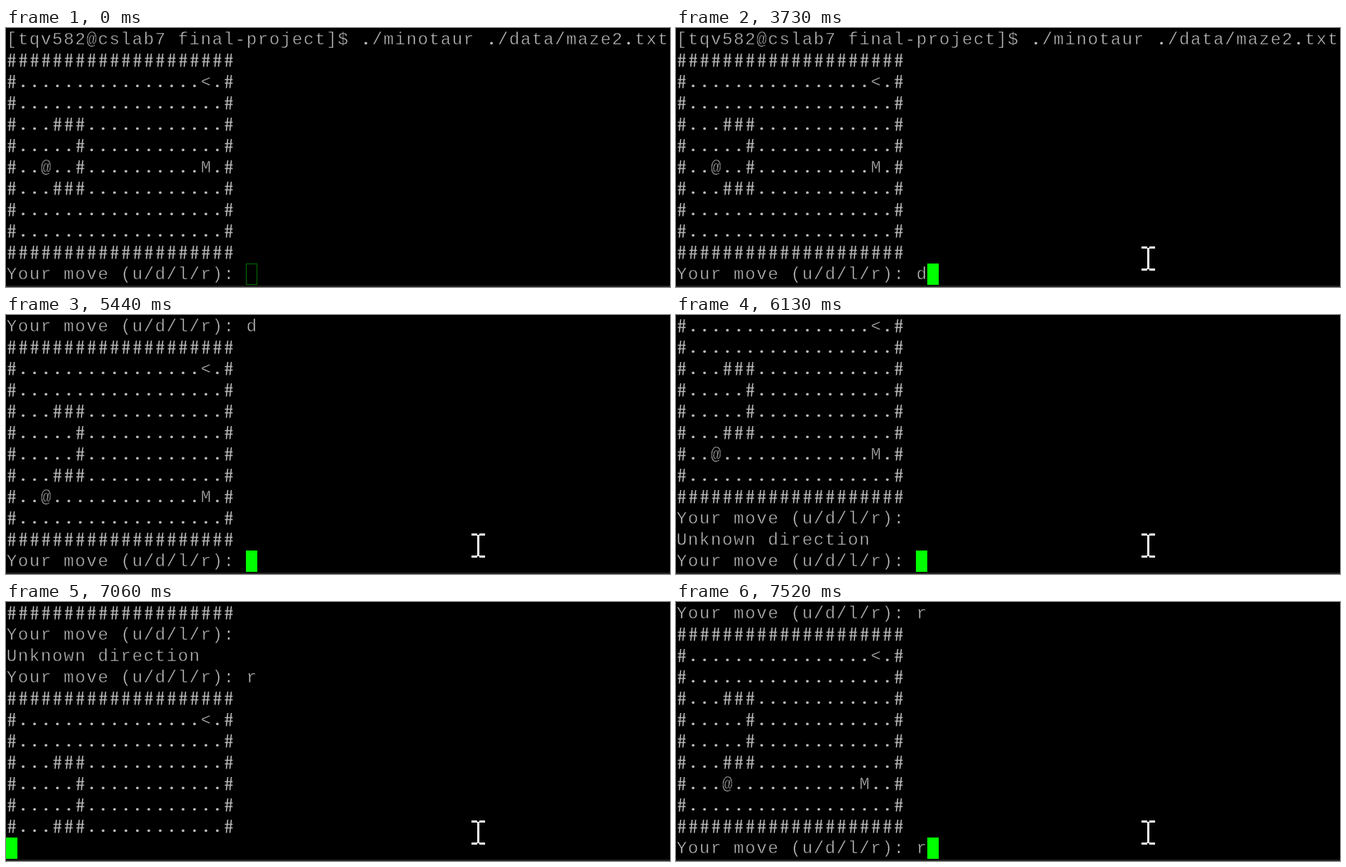
An HTML page with a canvas that plays this animation: 930x364 px, repeating every 8000 ms.

```html
<!DOCTYPE html>
<html lang="en">
<head>
<meta charset="utf-8">
<title>Maze game in a terminal</title>
<style>
  html, body { margin: 0; width: 100%; height: 100%; overflow: hidden; background: #000; }
  canvas { display: block; }
</style>
</head>
<body>
<canvas id="stage" width="930" height="364"></canvas>
<script>
const LOOP = 8000, ROWS = 12, COL_WIDTH = 16, ROW_HEIGHT = 30, TOP = 1, BASELINE = 22;
const ASK = "Your move (u/d/l/r): ";
const ctx = document.getElementById("stage").getContext("2d");

// Wall and floor marks, relative to the top left of a character cell.
const WALL = new Path2D("M6.6 5L4.6 23.5M11.6 5L9.6 23.5M2.5 11.5H13.5M2.5 16.5H13.5");
const FLOOR = new Path2D("M8 20.3h.01");
const POINTER = new Path2D("M652 308.5H660M663 308.5H671M661.5 309V339M652 339.5H660M663 339.5H671");

// Maze lines with the hero (@) and the minotaur (M) on the same row.
function maze(row, heroCol, monsterCol) {
  const edge = "#".repeat(20), open = "#" + ".".repeat(18) + "#";
  const corner = "#...###............#", wall = "#.....#............#";
  const lines = [edge, open, open, corner, wall, wall, corner, open, open, edge];
  const put = (y, x, mark) => {
    lines[y] = lines[y].slice(0, x) + mark + lines[y].slice(x + 1);
  };
  put(1, 17, "<");
  put(row, heroCol, "@");
  put(row, monsterCol, "M");
  return lines.map(line => line + "\n");
}

const turn = (...places) => maze(...places).join("") + ASK;
const lastMaze = maze(7, 4, 16);

// Text appended to the terminal at each time.
const output = [
  [0, "[tqv582@cslab7 final-project]$ ./minotaur ./data/maze2.txt\n" + turn(5, 3, 17)],
  [3730, "d"],
  [4510, "\n" + turn(6, 3, 17)],
  [5440, "d\n" + turn(7, 3, 17)],
  [6130, "\nUnknown direction\n" + ASK],
  [6750, "r"],
  [7060, "\n" + lastMaze.slice(0, 7).join("")],
  [7290, lastMaze.slice(7).join("") + ASK],
  [7520, "r"],
];

function strokePath(path, x, y, width, color) {
  ctx.save();
  ctx.translate(x, y);
  ctx.lineWidth = width;
  ctx.strokeStyle = color;
  ctx.stroke(path);
  ctx.restore();
}

function drawChar(char, x, y) {
  if (char === "#") return strokePath(WALL, x, y, 1.6, "#bbb");
  if (char === ".") {
    ctx.lineCap = "round";
    strokePath(FLOOR, x, y, 3.8, "#bbb");
    ctx.lineCap = "butt";
    return;
  }
  // A thin black outline keeps the strokes fine.
  ctx.fillStyle = "#bbb";
  ctx.strokeStyle = "#000";
  ctx.lineWidth = 0.5;
  ctx.fillText(char, x + COL_WIDTH / 2, y + BASELINE);
  ctx.strokeText(char, x + COL_WIDTH / 2, y + BASELINE);
}

function drawCursor(x, y, focused) {
  if (focused) {
    ctx.fillStyle = "#0f0";
    ctx.fillRect(x, y, COL_WIDTH, ROW_HEIGHT);
  } else {
    ctx.strokeStyle = "#007000";
    ctx.lineWidth = 1;
    ctx.strokeRect(x + 0.5, y + 0.5, COL_WIDTH - 1, ROW_HEIGHT - 1);
  }
}

function draw(now) {
  const t = now % LOOP;
  const log = output.filter(([start]) => start <= t).map(([, text]) => text).join("");
  const lines = log.split("\n").slice(-ROWS);

  ctx.fillStyle = "#000";
  ctx.fillRect(0, 0, 930, 364);
  ctx.font = '24px "Liberation Mono", "Courier New", monospace';
  ctx.textAlign = "center";
  lines.forEach((line, row) => [...line].forEach((char, col) =>
    drawChar(char, col * COL_WIDTH, TOP + row * ROW_HEIGHT)));
  drawCursor(lines[ROWS - 1].length * COL_WIDTH, TOP + (ROWS - 1) * ROW_HEIGHT, t >= 530);

  ctx.fillStyle = "#252422";
  ctx.fillRect(0, 362, 930, 2);

  // The pointer rises from below in steps, before the click that focuses the window.
  const step = Math.max(0, Math.min(5, Math.floor((t - 150) / 76) + 1));
  strokePath(POINTER, 0, Math.round(58 * (1 - step / 5) ** 2), 3, "#fff");
  requestAnimationFrame(draw);
}
requestAnimationFrame(draw);
</script>
</body>
</html>
```
